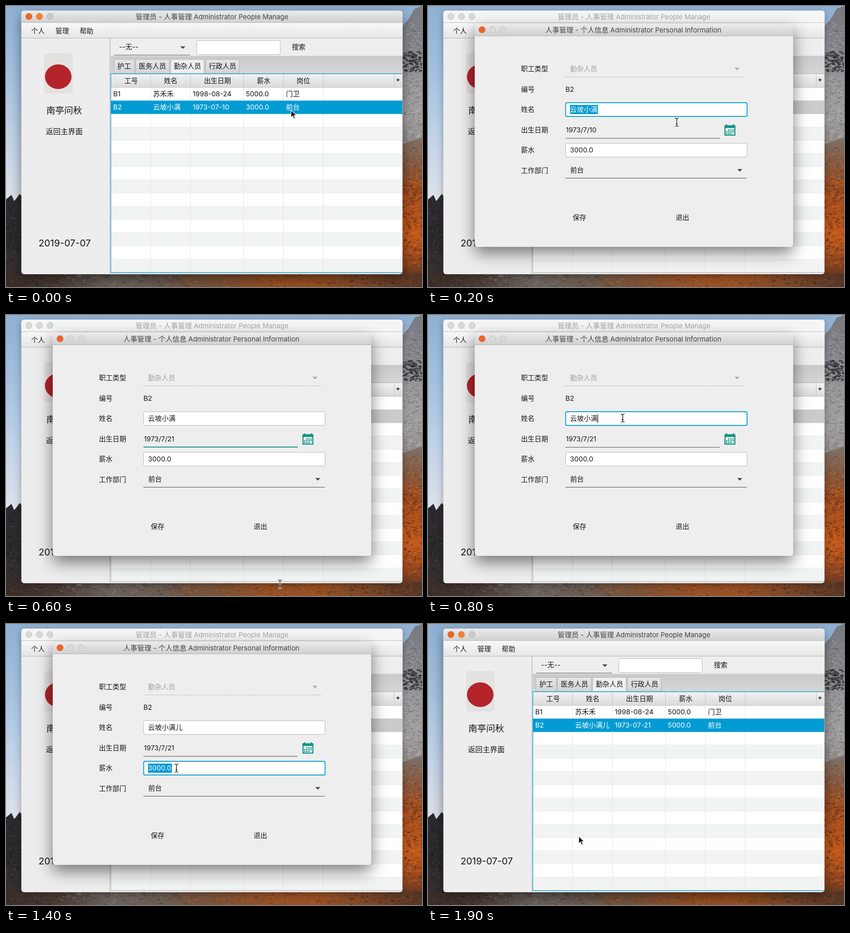
Write an HTML page with a canvas that moves like this. It is 908 by 616 pixels and loops after 2 s.

```html
<!DOCTYPE html>
<html lang="zh-CN">
<head>
<meta charset="utf-8">
<title>人事管理</title>
<style>
  html, body { margin: 0; width: 100%; height: 100%; overflow: hidden; }
  canvas, svg { position: absolute; left: 0; top: 0; width: 908px; height: 616px; }
  text { font-family: Inter, "Noto Sans CJK SC", "Noto Sans CJK", sans-serif; white-space: pre; }
  .window { filter: drop-shadow(0 5px 8px rgba(0,0,0,.3)); }
  .active .window { filter: drop-shadow(0 10px 13px rgba(0,0,0,.45)); }
  .dialog { filter: drop-shadow(0 14px 17px rgba(0,0,0,.5)); }
  .float { filter: drop-shadow(0 3px 5px rgba(0,0,0,.4)); }
  .bar { fill: #f5f5f5; } .active .bar { fill: url(#title); }
  .caption { fill: #a6a6a6; } .active .caption { fill: #444; }
  .light { fill: #d9d9d9; stroke: #c0c0c0; }
  .active .red { fill: #ee6526; stroke: #d4561c; }
  .active .amber { fill: #f58035; stroke: #dc6c22; }
  .active .grey { fill: #c9c9c9; stroke: #b5b5b5; }
  .picked { fill: #cbcbcb; } .active .picked { fill: #039bd3; }
  .frame { stroke: #bcbcbc; } .active .frame { stroke: #18a0cf; }
  .field { fill: #fff; stroke: #b4b4b4; }
  .field.focus { stroke: #0d9fca; stroke-width: 2; }
  #dateLine { stroke: #444; stroke-width: 1.2; }
  #dateLine.focus { stroke: #129484; stroke-width: 2; transform: translateY(-.6px); }
</style>
</head>
<body>
<canvas width="908" height="616"></canvas>
<svg id="stage" viewBox="0 0 908 616"></svg>
<script>
const TEAL = '#129484', BLUE = '#039bd3', INK = '#151515';
const stage = document.getElementById('stage');

// ---------- wallpaper ----------
const ctx = document.querySelector('canvas').getContext('2d');
let seed = 11;
const rnd = () => (seed = seed * 16807 % 2147483647) / 2147483647;

// Colours spread evenly from (x1, y1) to (x2, y2)
function blend(x1, y1, x2, y2, colors) {
  const fill = ctx.createLinearGradient(x1, y1, x2, y2);
  colors.forEach((c, i) => fill.addColorStop(i / (colors.length - 1), c));
  return fill;
}
function shape(fill, ...points) {
  ctx.fillStyle = fill;
  ctx.beginPath();
  points.forEach(([x, y]) => ctx.lineTo(x, y));
  ctx.fill();
}
function speckle(x, y, w, h, count, colors, alpha = .45) {
  ctx.globalAlpha = alpha;
  for (let i = 0; i < count; i++) {
    ctx.fillStyle = colors[Math.floor(rnd() * colors.length)];
    ctx.beginPath();
    ctx.ellipse(x + rnd() * w, y + rnd() * h, 1.5 + rnd() * 3, .6 + rnd() * 1.2, rnd() - .5, 0, 7);
    ctx.fill();
  }
  ctx.globalAlpha = 1;
}
function wallpaper() {
  ctx.fillStyle = blend(0, 0, 0, 430, ['#90b0d2', '#a3c0df', '#c1d3e8', '#dfe1ea']);
  ctx.fillRect(0, 0, 908, 616);

  shape(blend(0, 0, 0, 320, ['#77797f', '#85868b', '#97969a', '#a19f9f', '#8a8380']),
    [908, 0], [892, 6], [878, 30], [860, 50], [860, 320], [908, 320]);
  speckle(874, 36, 40, 60, 90, ['#5f626a', '#a4a3a7']);
  speckle(862, 150, 50, 150, 260, ['#bbb8b7', '#6d6c70', '#aaa6a4']);
  speckle(862, 100, 46, 44, 160, ['#26282f', '#3a3c42'], .75);

  shape(blend(0, 290, 0, 616, ['#7d7169', '#85593f', '#9b4d22', '#b3521d', '#c1591d', '#8c4420', '#4a3023']),
    [860, 305], [908, 288], [908, 616], [860, 616]);
  speckle(862, 310, 50, 70, 90, ['#9a8879', '#4f4039', '#a3633a']);
  speckle(862, 380, 50, 190, 360, ['#dd7425', '#6d2f16', '#c5561a', '#43251b']);

  shape(blend(0, 415, 0, 616, ['#2b2a2f', '#2c292c', '#3a302d']),
    [0, 424], [12, 414], [18, 428], [30, 412], [40, 424], [40, 616], [0, 616]);
  speckle(0, 425, 38, 180, 130, ['#1a1a1f', '#46424a']);

  shape(blend(0, 0, 908, 0, ['#382c28', '#4a3b33', '#6a625d', '#6a5a4f', '#7a5238', '#975026', '#995022', '#7a4629', '#523425']),
    [0, 586], [908, 586], [908, 616], [0, 616]);
  speckle(0, 588, 130, 28, 70, ['#231d1c', '#5d4a3e']);
  speckle(120, 588, 260, 28, 170, ['#8a837c', '#3f3834', '#6b5f56']);
  speckle(370, 588, 390, 28, 240, ['#b7632a', '#5a3826', '#8a5a3a']);
  speckle(750, 588, 158, 28, 100, ['#3a251c', '#8c4f2a']);
}

// ---------- markup helpers ----------
const text = (x, y, s, size = 15, fill = INK, more = '') =>
  `<text x="${x}" y="${y + size * .365}" font-size="${size}" fill="${fill}" ${more}>${s}</text>`;
const mid = (x, y, s, size, fill, more = '') => text(x, y, s, size, fill, 'text-anchor="middle" ' + more);
const rect = (x, y, w, h, fill, more = '') =>
  `<rect x="${x}" y="${y}" width="${w}" height="${h}" fill="${fill}" ${more}/>`;
const line = (x1, y1, x2, y2, color, more = '') =>
  `<line x1="${x1}" y1="${y1}" x2="${x2}" y2="${y2}" stroke="${color}" ${more}/>`;
const path = (d, fill, more = '') => `<path d="${d}" fill="${fill}" ${more}/>`;
const field = (id, x, y, w, h) => rect(x, y, w, h, '#fff', `id="${id}" class="field" rx="3"`);
const arrowDown = (x, y, color) => path(`M${x - 5.5} ${y - 2.5}h11l-5.5 5.5z`, color);
const times = (n, fn) => Array.from({ length: n }, (_, i) => fn(i)).join('');
const gradient = (id, a, b) =>
  `<linearGradient id="${id}" x2="0" y2="1"><stop stop-color="${a}"/><stop offset="1" stop-color="${b}"/></linearGradient>`;
const lights = (x, y, kinds) => kinds.map((k, i) =>
  `<circle cx="${x + i * 23}" cy="${y}" r="6.8" class="light ${k}"/>`).join('');

// ---------- main window ----------
const columns = [315.5, 402.5, 518.5, 605.5, 692.5];
const rowTop = i => 179 + i * 28.95;

function tab([x, w, label], i) {
  const on = i === 2;
  return path(`M${x + .5} 148v-28q0-3 3-3h${w - 6}q3 0 3 3v28z`, on ? '#efefef' : 'url(#tab)', 'stroke="#aeaeae"') +
    mid(x + w / 2 + .5, 132, label, 14.9);
}
function table() {
  const heads = [[273, '工号'], [359.5, '姓名'], [461.5, '出生日期'], [562.5, '薪水'], [649, '岗位']];
  const first = ['B1', '苏禾禾', '1998-08-24', '5000.0', '门卫'];
  const second = ['B2', '', '', '', '前台'];
  const left = [234, 321, 407.5, 523.5, 611];
  return rect(228, 148, 637, 437, '#fff') +
    rect(229, 149, 636, 29.5, 'url(#head)') + line(229, 178.5, 865, 178.5, '#c4c4c4') +
    times(14, i => rect(229, rowTop(i), 636, 28.95, i % 2 ? '#f2f3f3' : '#fff') +
      line(229, rowTop(i + 1) - .5, 865, rowTop(i + 1) - .5, '#e6e6e6')) +
    columns.map(x => line(x, 149, x, 178, '#c2c2c2') + line(x, 179, x, 584, '#e2e2e2')).join('') +
    line(847.5, 149, 847.5, 178, '#c2c2c2') + path('M852 162h7M855.5 158.5v7', 'none', 'stroke="#333" stroke-width="1.8"') +
    rect(229, rowTop(1) - .5, 636, 29.2, BLUE, 'class="picked"') +
    heads.map(([x, s]) => mid(x, 163.5, s, 14.8)).join('') +
    first.map((s, i) => text(left[i], 193, s)).join('') +
    second.map((s, i) => text(left[i], 222, s, 15, '#fff', `id="cell${i}"`)).join('') +
    path('M865 148.5H228.7V584.5H865', 'none', 'class="frame" stroke-width="1.4"');
}
const mainWindow = () =>
  rect(33.5, 10, 832, 578, '#ededed', 'class="window" rx="6"') +
  '<g clip-path="url(#mainClip)">' +
  rect(33, 10, 833, 26, '#eee', 'class="bar"') +
  line(34, 36.5, 865, 36.5, '#bdbdbd') +
  rect(34, 37, 832, 33, 'url(#menu)') + line(34, 70.5, 865, 70.5, '#b3b3b3') +
  lights(50, 23, ['red', 'amber', 'grey']) +
  text(283, 23.5, '管理员 - 人事管理', 15.3, '#444', 'class="caption"') +
  text(410, 23.5, 'Administrator People Manage', 14.78, '#444', 'class="caption"') +
  text(55, 54.5, '个人', 14.8) + text(108, 54.5, '管理', 14.8) + text(161, 54.5, '帮助', 14.8) +
  rect(83, 103, 63, 89, '#e4e2e1', 'rx="7"') +
  '<ellipse cx="114" cy="155" rx="29" ry="27" fill="#b3242b"/>' +
  text(88, 228.5, '南亭问秋', 19.5) + text(87, 275, '返回主界面', 16.1) + text(71, 519, '2019-07-07', 20.6) +
  line(226.5, 71, 226.5, 588, '#bdbdbd') + line(228, 71, 228, 148, '#c8c8c8') +
  rect(228.5, 71, 637, 39, '#eee') + line(228, 110, 865, 110, '#b9b9b9') +
  text(247, 90, '--无--', 14.8) + arrowDown(386, 91, '#444') + line(236, 107.5, 402, 107.5, '#555', 'stroke-width="1.2"') +
  field('search', 416.5, 75.5, 182, 31) + text(624, 90, '搜索', 14.8) +
  rect(228.5, 110.5, 637, 38, 'url(#tabs)') +
  [[235, 45, '护工'], [282, 74, '医务人员'], [359, 73, '勤杂人员'], [435, 74, '行政人员']].map(tab).join('') +
  table() + '</g>';

// ---------- dialog ----------
const calendarIcon = () =>
  rect(648.2, 263, 21.6, 20, '#f4f7f6', `stroke="${TEAL}" stroke-width="2.4"`) + rect(647, 261.5, 24, 6, TEAL) +
  rect(650, 259.5, 3, 4, TEAL) + rect(665, 259.5, 3, 4, TEAL) +
  times(12, i => i === 0 || i === 11 ? '' : rect(650.5 + i % 4 * 4.6, 270.5 + Math.floor(i / 4) * 3.9, 3, 2.6, TEAL));

const dialog = () => '<g id="dialog">' +
  rect(102, 39, 695, 489, '#eee', 'class="dialog" rx="6"') +
  path('M102 65V45q0-6 6-6H791q6 0 6 6V65z', 'url(#title)') + line(102, 65.5, 797, 65.5, '#b4b4b4') +
  '<g class="active">' + lights(118, 52, ['red']) + '</g>' + lights(141, 52, ['', '']) +
  text(256, 52.5, '人事管理 - 个人信息', 15.3, '#444') +
  text(398, 52.5, 'Administrator Personal Information', 14.78, '#444') +
  ['职工类型', '编号', '姓名', '出生日期', '薪水', '工作部门'].map((s, i) => text(203, 138 + i * 44.5, s, 14.8)).join('') +
  text(310, 138, '勤杂人员', 14.8, '#a0a0a0') + arrowDown(674.5, 138, '#a8a8a8') +
  line(300, 155.5, 689, 155.5, '#999', 'stroke-dasharray="2 2"') +
  text(300, 183, 'B2') +
  field('nameField', 300.5, 212, 396, 30) + rect(310, 217, 61, 20, BLUE, 'id="nameSel"') +
  text(310, 227, '', 15, INK, 'id="name"') +
  path('M371 236.5h15', 'none', 'id="compose" stroke="#333" stroke-dasharray="2 1"') +
  text(301, 271.5, '', 14.8, INK, 'id="date"') +
  line(300, 290, 637, 290, '#444', 'id="dateLine"') + calendarIcon() +
  field('payField', 300.5, 301, 396, 30) + rect(310, 306, 52, 20, BLUE, 'id="paySel"') +
  text(310, 316, '', 15, INK, 'id="pay"') +
  text(310.5, 360, '前台', 14.8) + arrowDown(680.5, 360, '#444') +
  line(300, 377.5, 696, 377.5, '#444', 'stroke-width="1.2"') +
  text(316, 463.5, '保存', 14.8) + text(540.5, 463.5, '退出', 14.8) +
  rect(0, 0, 1.2, 19, '#111', 'id="caret"') + '</g>';

const calendar = () => {
  const col = i => 338.5 + i % 7 * 46.95;
  return '<g id="calendar">' + rect(301, 289, 357, 326.5, '#fff', 'class="float"') +
    rect(301, 289, 357, 94, TEAL) + text(329, 314, '1973', 15.8, '#9fd3cc') +
    text(329, 347.5, '周二, 7月 10', 36.3, '#fff') +
    path('M341 406l-5 5.5 5 5.5M617 406l5 5.5-5 5.5', 'none', 'stroke="#111" stroke-width="2.4"') +
    mid(479.5, 412, '七月 1973', 14.5) +
    times(7, i => mid(col(i), 455, '周', 13, '#8a8a8a')) +
    `<circle cx="432.5" cy="542" r="24" fill="${TEAL}"/>` +
    times(21, i => mid(col(i), 493.5 + Math.floor(i / 7) * 48.7, i + 1, 13.6, i === 9 ? '#fff' : INK)) +
    line(301, 615.5, 658, 615.5, '#777') + '</g>';
};

const candidates = () => {
  const list = [[468, '而'], [515, '尔'], [562, '儿'], [609, '耳'], [656, ''], [711, '迩']];
  return '<g id="candidates">' + rect(361, 243, 466.5, 35, '#fff', 'class="float" rx="4"') +
    rect(362.5, 245.5, 42.5, 30, '#0a60df', 'rx="4"') + text(366.5, 261, '1', 14, '#fff') + text(379, 260, '二', 18, '#fff') +
    text(414, 261, '2', 14, '#8a8a8a') + rect(427, 247, 23, 23, 'url(#key)', 'rx="5"') +
    mid(438.5, 258.5, '2', 17, '#fff', 'font-weight="700"') +
    list.map(([x, s], i) => text(x, 261, i + 3, 14, '#8a8a8a') + text(x + 12, 260, s, 18, '#111')).join('') +
    path('M674 255c0-9 14-10 14-1 0 6-5 7-6 12-1 5-6 5-6 1 0-5-2-7-2-12z', '#ee8b2f') +
    path('M677 254c1-5 8-5 8 0 0 4-4 3-5 8', 'none', 'stroke="#b85c16" stroke-width="1.6"') +
    path('M804 258l6 6 6-6', 'none', 'stroke="#8c8c8c" stroke-width="1.8"') + '</g>';
};

const pointers = () =>
  path('M0 0v16.5l3.8-3.5 2.7 6.3 2.9-1.2-2.7-6.2h5.2z', '#111', 'id="arrow" stroke="#fff" stroke-width="1.2"') +
  '<g id="beam" fill="none">' + ['#fff" stroke-width="3.2', '#222" stroke-width="1.5'].map(s =>
    `<path stroke="${s}" d="M-4-9q3 0 4 2q1-2 4-2M0-7V7M-4 9q3 0 4-2q1 2 4 2M-2 3.5h4"/>`).join('') + '</g>';

wallpaper();
stage.innerHTML = '<defs>' +
  gradient('title', '#ebebeb', '#d0d0d0') + gradient('menu', '#f8f8f8', '#e6e6e6') +
  gradient('tabs', '#cacaca', '#d6d6d6') + gradient('tab', '#e6e6e6', '#d3d3d3') +
  gradient('head', '#f2f2f2', '#dadada') + gradient('key', '#94a0a8', '#66747e') +
  '<clipPath id="mainClip">' + rect(33.5, 10, 832, 578, '#000', 'rx="6"') + '</clipPath></defs>' +
  '<g id="main">' + mainWindow() + '</g>' + dialog() + calendar() + candidates() + pointers();

// ---------- timeline: each step lists what changes every 100 ms ----------
const NAME = '云坡小满';
const steps = [
  { open: false, name: NAME, date: '1973/7/10', pay: '3000.0', arrow: [622, 228] },
  { open: true, focus: 'name', selected: 'name', beam: [608, 236] },
  { beam: [543, 255] },
  { arrow: [640, 268] },
  { focus: 'date', selected: '', caret: 'date', popup: 'calendar', arrow: [652, 272] },
  { arrow: [619, 588] },
  { date: '1973/7/21', caret: '', popup: '', beam: [598, 590] },
  { arrow: [505, 395] },
  { focus: 'name', caret: 'name', beam: [425, 226] },
  {},
  {},
  { name: NAME + 'er', caret: '', popup: 'candidates' },
  { name: NAME + '儿', caret: 'name', popup: '' },
  { caret: '', beam: [400, 300] },
  { focus: 'pay', selected: 'pay', beam: [372, 316] },
  { pay: '5', selected: '', caret: 'pay' },
  { pay: '500' },
  { pay: '5000', arrow: [352, 425] },
  { arrow: [329, 465] },
  { open: false },
];
const states = [];
steps.forEach((step, i) => {
  const state = { ...states[i - 1], ...step };
  if (step.arrow) state.beam = null;
  if (step.beam) state.arrow = null;
  states.push(state);
});

const $ = id => document.getElementById(id);
const show = (id, on) => { $(id).style.display = on ? '' : 'none'; };

function render(s) {
  $('main').classList.toggle('active', !s.open);
  show('dialog', s.open);
  ['calendar', 'candidates'].forEach(id => show(id, s.popup === id));
  show('compose', s.popup === 'candidates');
  ['name', 'date', 'pay'].forEach(id => { $(id).textContent = s[id]; });
  ['name', 'pay'].forEach(id => {
    show(id + 'Sel', s.selected === id);
    $(id).setAttribute('fill', s.selected === id ? '#fff' : INK);
    $(id + 'Field').classList.toggle('focus', s.focus === id);
  });
  $('dateLine').classList.toggle('focus', s.focus === 'date');

  $('cell1').textContent = s.name;
  $('cell2').textContent = s.date.replace('/7/', '-07-');
  $('cell3').textContent = s.pay.includes('.') ? s.pay : s.pay + '.0';

  show('caret', s.caret);
  if (s.caret) {
    const owner = $(s.caret);
    $('caret').setAttribute('x', +owner.getAttribute('x') + owner.getComputedTextLength());
    $('caret').setAttribute('y', +owner.getAttribute('y') - 15);
  }
  ['arrow', 'beam'].forEach(id => {
    show(id, s[id]);
    if (s[id]) $(id).setAttribute('transform', `translate(${s[id]})`);
  });
}

const start = performance.now();
let current = -1;
function tick(now) {
  const index = Math.floor(Math.max(0, now - start) % 2000 / 100);
  if (index !== current) render(states[current = index]);
  requestAnimationFrame(tick);
}
tick(start);
</script>
</body>
</html>
```
